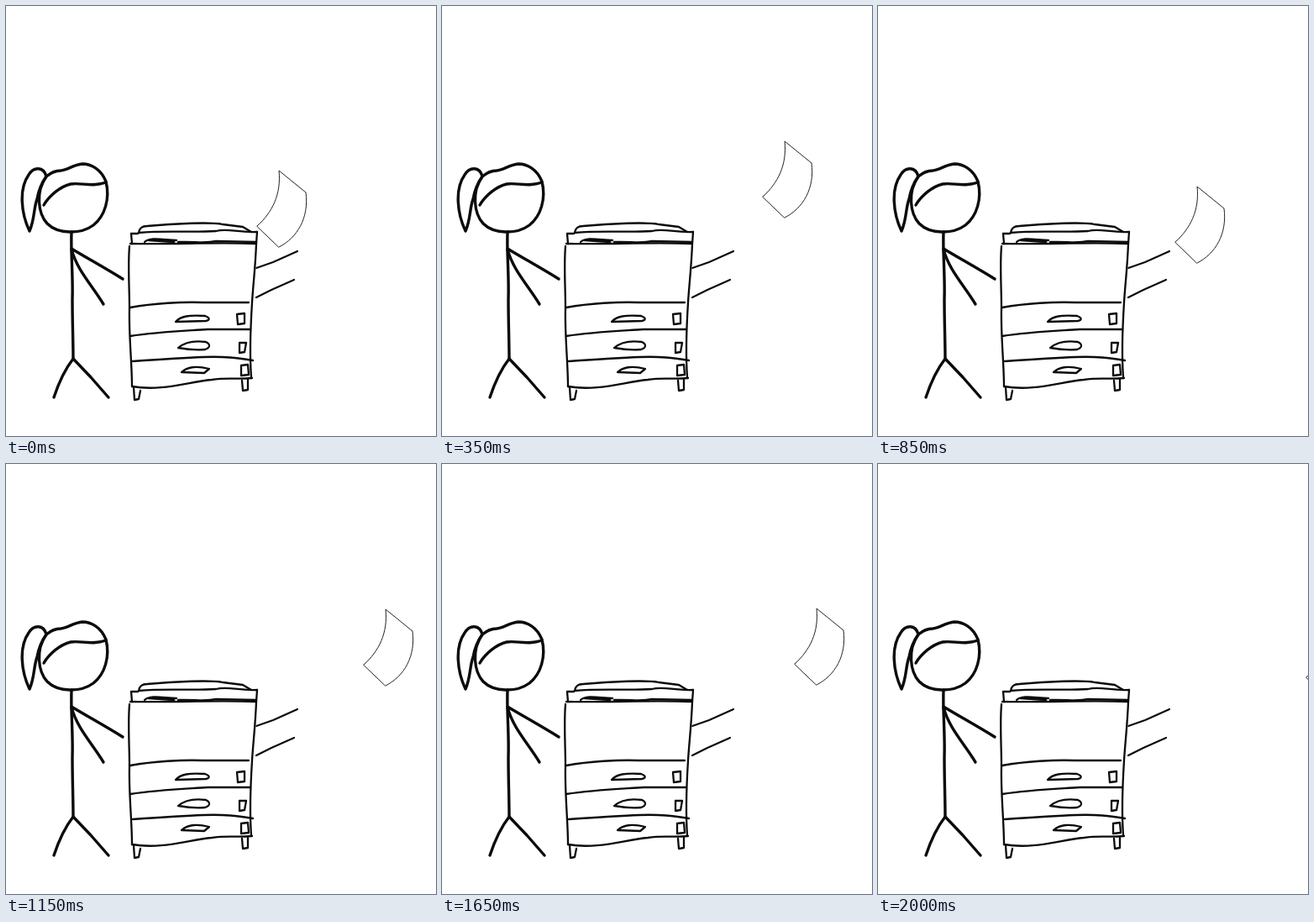
Animation of 512 by 512 pixels, one loop 2.05 s. Source, as an HTML page without scripts:

```html
<!DOCTYPE html>
<html lang="en">
<head>
<meta charset="utf-8">
<title>Runaway copier</title>
<style>
  html, body { margin: 0; width: 100%; height: 100%; overflow: hidden; background: #fff; }
  svg { display: block; width: 100%; height: 100%; }
  path { fill: none; stroke: #0b0b0b; stroke-linecap: round; stroke-linejoin: round; }
  .girl path { stroke-width: 3.4; }
  .copier path { stroke-width: 2.3; }
  .tray { stroke-width: 2.2; }
  .copier .body { fill: #fff; stroke: none; }
  .sheet {
    fill: #fff; stroke: #222; stroke-width: 1;
    animation: fly 2050ms -4ms infinite;
  }
  /* Eight sheets shoot out in turn, each on its own straight line */
  @keyframes fly {
    0%      { transform: translate(299px, 262px); animation-timing-function: steps(5); }
    12.194% { transform: translate(549px, 137px); animation-timing-function: step-start; }
    12.195% { transform: translate(300px, 287px); animation-timing-function: steps(6); }
    26.828% { transform: translate(546px, 107px); animation-timing-function: step-start; }
    26.829% { transform: translate(317px, 287px); animation-timing-function: steps(5); }
    39.023% { transform: translate(627px, 147px); animation-timing-function: step-start; }
    39.024% { transform: translate(304px, 307.5px); animation-timing-function: steps(5); }
    51.219% { transform: translate(554px, 175px); animation-timing-function: step-start; }
    51.22%  { transform: translate(310px, 293px); animation-timing-function: steps(5); }
    63.414% { transform: translate(600px, 158px); animation-timing-function: step-start; }
    63.415% { transform: translate(304px, 285px); animation-timing-function: steps(5); }
    75.609% { transform: translate(554px, 55px); animation-timing-function: step-start; }
    75.61%  { transform: translate(308px, 298px); animation-timing-function: steps(5); }
    87.804% { transform: translate(588px, 148px); animation-timing-function: step-start; }
    87.805% { transform: translate(302px, 306px); animation-timing-function: steps(5); }
    100%    { transform: translate(562px, 241px); }
  }
</style>
</head>
<body>
<svg viewBox="0 0 512 512">
  <path class="tray" d="M298 312L318 305L347 292M298 347L316 338L343 326"/>
  <path class="sheet" d="M0 0C18-16 29-38 26-66L58-40C62-10 48 14 26 25Z"/>

  <g class="copier">
    <path class="body" d="M148 284L158 266L200 259L283 262L299 270L292 444L150 454Z"/>
    <!-- lid -->
    <path d="M158 270C159 264 162 262 168 262C200 259 245 257 258 260L282 263L292 269"/>
    <path d="M158 270C190 267 220 270 250 268C264 264 275 270 299 269"/>
    <path d="M157 271L149 271L150 283M299 269L298 283"/>
    <path d="M148 283C200 284 250 281 298 283"/>
    <path d="M165 281C172 275 184 278 203 279M170 279L200 281M205 281C225 280 235 283 250 280L298 281"/>
    <!-- cabinet and drawers -->
    <path d="M147 286C145 310 147 335 147 360C146 390 150 425 150 453"/>
    <path d="M298 283C297 310 294 335 293 353C291 385 290 415 292 442"/>
    <path d="M148 359C175 354 210 352 235 353L289 353"/>
    <path d="M148 393C180 388 210 387 240 385L291 385"/>
    <path d="M151 423C180 421 210 419 235 418C260 417 275 419 294 422"/>
    <path d="M150 453C185 459 215 448 245 445C265 442 275 445 293 443"/>
    <!-- handles -->
    <path d="M202 376C208 369 218 368 237 369C243 371 243 374 238 375Z"/>
    <path d="M205 407C212 401 224 398 238 400C244 403 243 407 237 409C226 410 216 409 205 407Z"/>
    <path d="M209 436C216 430 225 428 242 432L236 437Z"/>
    <!-- locks and feet -->
    <path d="M275 367L284 366L284 378L276 379Z"/>
    <path d="M278 401L286 401L284 412L278 413Z"/>
    <path d="M280 428L288 427L289 439L280 440Z"/>
    <path d="M152 454L153 469L158 468L160 458M281 446L282 458L288 457L288 445"/>
  </g>

  <g class="girl">
    <path d="M48 203C35 221 38 247 49 259C62 272 89 272 104 261C118 250 124 229 119 209C113 194 101 188 91 188C80 189 74 195 65 196C58 196 54 198 48 203"/>
    <path d="M48 203C45 191 33 191 27 201C15 218 18 247 28 268C34 255 33 240 37 230C39 218 43 210 48 203"/>
    <path d="M45 237C52 225 65 215 77 212C90 210 102 216 119 210"/>
    <path d="M78 269C77 295 80 320 79 350C79 375 80 400 80 420"/>
    <path d="M78 289C98 301 118 312 139 325M78 290C85 315 102 332 116 355"/>
    <path d="M80 420C69 434 62 451 57 466M80 420L101 442L122 466"/>
  </g>
</svg>
</body>
</html>
```
